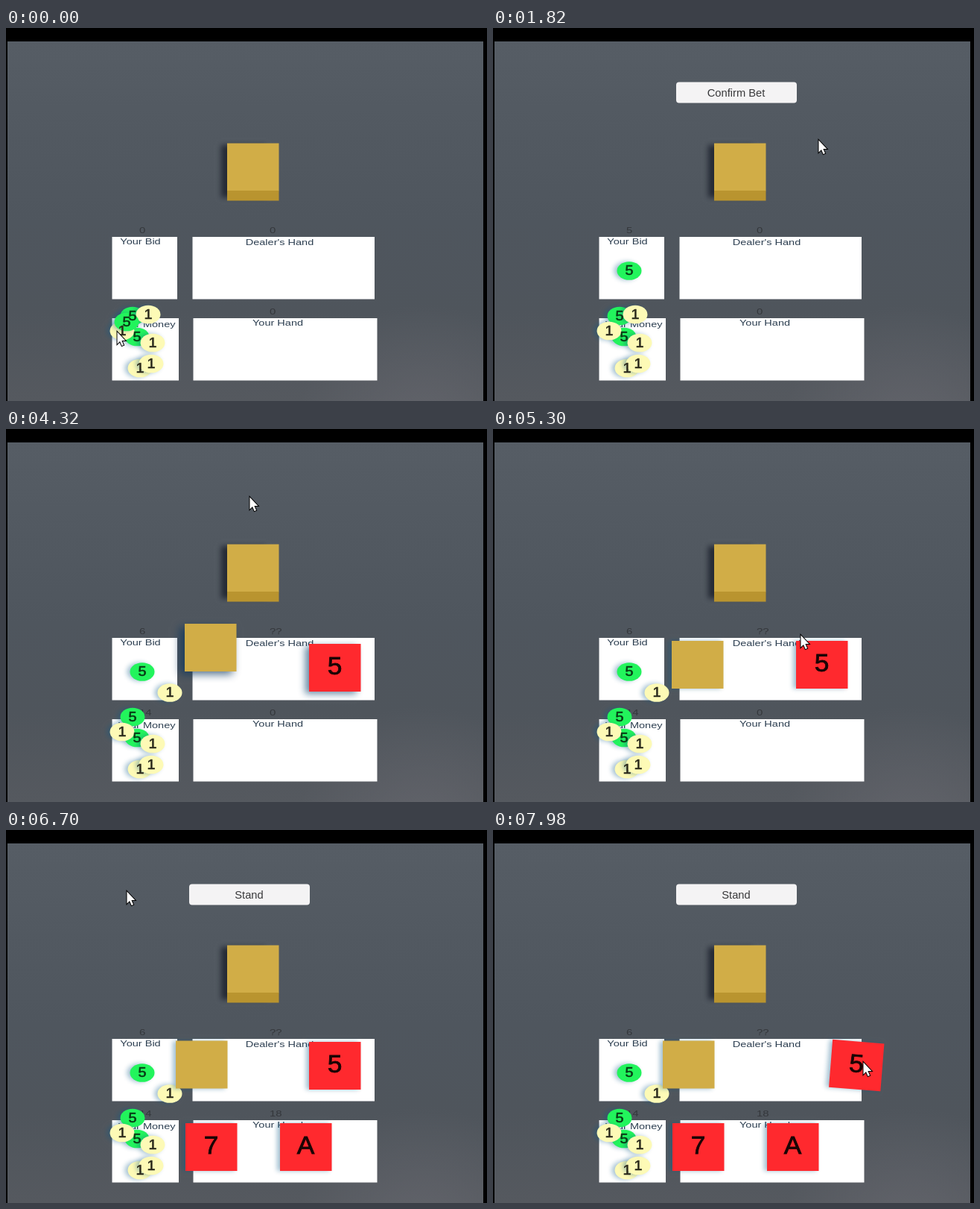
These frames come from a looping animation (646x500 px, 8000 ms). An HTML page with a canvas:

```html
<!DOCTYPE html>
<html lang="en">
<head>
<meta charset="utf-8">
<title>Card table</title>
<style>
html, body { margin: 0; width: 100%; height: 100%; overflow: hidden; background: #000; }
canvas { display: block; }
</style>
</head>
<body>
<canvas id="stage" width="646" height="500"></canvas>
<script>
const ctx = document.getElementById('stage').getContext('2d');
const LOOP = 8000, FALL = 7.5, DECK_Y = 193;
const GREEN = '#22f45c', YELLOW = '#fdfab6', RED = '#ff292e', GOLD = '#d1ad47';

const clamp = u => Math.min(1, Math.max(0, u));
const ease = (t, start, length) => {
  const u = clamp((t - start) / length);
  return u * u * (3 - 2 * u);
};

// The cursor reaches each stop at its time and rests there for `hold` ms.
const stop = (time, x, y, hold = 0) => ({ time, x, y, hold });
const stops = [
  stop(0, 149, 407, 50), stop(820, 158, 398, 80), stop(1250, 179, 322, 80),
  stop(1660, 437, 150, 530), stop(2520, 350, 104), stop(3160, 193, 381, 80),
  stop(3530, 222, 343, 70), stop(3830, 327, 91, 620), stop(5110, 413, 276, 190),
  stop(6200, 282, 325, 130), stop(6440, 270, 316), stop(6690, 162, 82, 20),
  stop(6940, 388, 398), stop(7140, 446, 330), stop(7360, 580, 262),
  stop(7600, 492.5, 322), stop(7800, 482, 372, 60), stop(7970, 497, 311)
];

function cursorAt(t) {
  const i = stops.findLastIndex(s => s.time <= t);
  const a = stops[i], b = stops[i + 1] || a;
  const start = a.time + a.hold;
  const u = b === a ? 0 : ease(t, start, b.time - start);
  return { x: a.x + (b.x - a.x) * u, y: a.y + (b.y - a.y) * u };
}

const chip = (n, x, y, drag) => ({ n, x, y, drag });
const chips = [
  chip(5, 170, 386), chip(5, 176, 414), chip(1, 156, 406), chip(1, 197, 422),
  chip(1, 180, 456), chip(1, 195, 450),
  chip(1, 191, 384, { grab: 3240, drop: 3600 }),
  chip(5, 162, 394, { grab: 900, drop: 1330 })
];

const card = (face, x, y, dealt, drag) => ({ face, x, y, dealt, drag });
const cards = [
  card('5', 441.5, 316, 4105, { grab: 7140, drop: 7600, turn: .08 }),
  card('', 274.5, 316, 4246, { grab: 6330, drop: 6440 }),
  card('A', 402.5, 425, 5400),
  card('7', 275.5, 425, 5540)
];

// Dealt pieces drop in with a small bounce; dragged ones follow the cursor, then fall.
function pose({ x, y, dealt, drag }, t) {
  let lift = 0, angle = 0;
  if (dealt) {
    const age = t - dealt;
    y += (DECK_Y - y) * Math.exp(-age / 65) * Math.cos(age / 80);
    lift = clamp(1 - age / 450);
  }
  if (drag && t > drag.grab) {
    const from = cursorAt(drag.grab), to = cursorAt(Math.min(t, drag.drop));
    const fallen = ease(t, drag.drop, 200);
    x += to.x - from.x;
    y += to.y - from.y + FALL * fallen;
    lift = ease(t, drag.grab, 80) - fallen;
    angle = (drag.turn || 0) * ease(t, drag.grab, drag.drop - drag.grab);
  }
  return { x, y, lift, angle };
}

function rect(x, y, w, h, fill) {
  ctx.fillStyle = fill;
  ctx.fillRect(x, y, w, h);
}

function text(str, x, y, size, color, { wide = 1, align = 'center', weight = 0 } = {}) {
  ctx.save();
  ctx.translate(x, y);
  ctx.scale(wide, 1);
  ctx.font = `${size}px "Liberation Sans", Arial, sans-serif`;
  ctx.textAlign = align;
  ctx.fillStyle = ctx.strokeStyle = color;
  ctx.lineWidth = weight;
  ctx.fillText(str, 0, size * .358);
  if (weight) ctx.strokeText(str, 0, size * .358);
  ctx.restore();
}

// Table lettering is seen in perspective, so it looks wider than tall.
const label = (str, x, y) => text(str, x, y, 11, '#2c3e50', { wide: 1.32 });
const count = (str, x, y) => text(str, x, y, 11, '#34373b', { wide: 1.36, align: 'left' });

function shadow(lift) {
  ctx.shadowColor = `rgba(10,${90 - 45 * lift},${135 - 50 * lift},${.38 + .45 * lift})`;
  ctx.shadowBlur = 6 + 6 * lift;
  ctx.shadowOffsetX = -4 - 2 * lift;
  ctx.shadowOffsetY = 5 * lift;
}

function drawTable() {
  rect(0, 0, 646, 500, '#000');
  const base = ctx.createLinearGradient(0, 18, 0, 500);
  ['#565d65', '#525961', '#4f565e', '#4f555c', '#55595f']
    .forEach((color, i) => base.addColorStop(i / 4, color));
  rect(2, 18, 639, 482, base);
  const glow = ctx.createRadialGradient(560, 540, 20, 560, 540, 170);
  glow.addColorStop(0, 'rgba(120,118,126,.32)');
  glow.addColorStop(1, 'rgba(120,118,126,0)');
  rect(380, 370, 261, 130, glow);

  ctx.save();
  ctx.shadowColor = 'rgba(20,26,38,.75)';
  ctx.shadowBlur = 7;
  ctx.shadowOffsetX = -8;
  rect(297, 157, 60, 70, GOLD);
  ctx.restore();
  rect(297, 154.5, 69.5, 64, GOLD);
  rect(297, 218, 69.5, 13.5, '#b9942f');

  rect(142.5, 280, 87.5, 83.5, '#fff');
  rect(250.5, 280, 244.5, 83.5, '#fff');
  rect(142.5, 389, 89.5, 83.5, '#fff');
  rect(251.5, 389, 247, 83.5, '#fff');
  label('Your Bid', 180.5, 286);
  label("Dealer's Hand", 367.5, 287.5);
  label('Your Money', 189, 397);
  label('Your Hand', 365, 395.5);
}

function drawCounts(t) {
  const bid = t < 1250 ? 0 : t < 3530 ? 5 : 6;
  count(bid, 179, 271);
  count(20 - bid, 179, 380);
  count(t < 4150 ? 0 : '??', 354, 271);
  count(t < 5450 ? 0 : t < 5600 ? 11 : 18, 354, 380);
}

function drawButton(str) {
  ctx.fillStyle = '#f4f3f4';
  ctx.beginPath();
  ctx.roundRect(246, 72.5, 162, 28, 4);
  ctx.fill();
  text(str, 326.5, 86.5, 14.7, '#38383a');
}

// Digits go on after all chips, as they show through the ones on top.
function drawChips(t) {
  const placed = chips.map(c => ({ n: c.n, ...pose(c, t) }));
  for (const { n, x, y, lift } of placed) {
    ctx.save();
    shadow(lift);
    ctx.fillStyle = n === 5 ? GREEN : YELLOW;
    ctx.beginPath();
    ctx.ellipse(x, y, 16.5, 12.3, 0, 0, 7);
    ctx.fill();
    ctx.restore();
  }
  for (const { n, x, y } of placed)
    text(n, x, y - .5, 18, n === 5 ? '#083c16' : '#2b2a1c', { wide: 1.1, weight: .6 });
}

function drawCard(c, t) {
  if (t < c.dealt) return;
  const { x, y, lift, angle } = pose(c, t);
  ctx.save();
  ctx.translate(x, y);
  ctx.rotate(angle);
  ctx.save();
  shadow(lift);
  rect(-34.5, -32, 69.5, 64, c.face ? RED : GOLD);
  ctx.restore();
  text(c.face, 0, -3, 34, '#1a0505', { wide: 1.04, weight: .8 });
  ctx.restore();
}

const arrow = new Path2D('M.5 .5V16.5L4 13L6.6 19L9 18L6.4 12H11.3Z');
function drawCursor(t) {
  const { x, y } = cursorAt(t);
  ctx.save();
  ctx.translate(x, y);
  ctx.fillStyle = '#fff';
  ctx.strokeStyle = '#000';
  ctx.lineWidth = 2;
  ctx.stroke(arrow);
  ctx.fill(arrow);
  ctx.restore();
}

function frame() {
  const t = performance.now() % LOOP;
  drawTable();
  drawCounts(t);
  drawChips(t);
  cards.forEach(c => drawCard(c, t));
  if (t >= 1300 && t < 3960) drawButton('Confirm Bet');
  if (t >= 5800) drawButton('Stand');
  drawCursor(t);
  requestAnimationFrame(frame);
}
frame();
</script>
</body>
</html>
```
